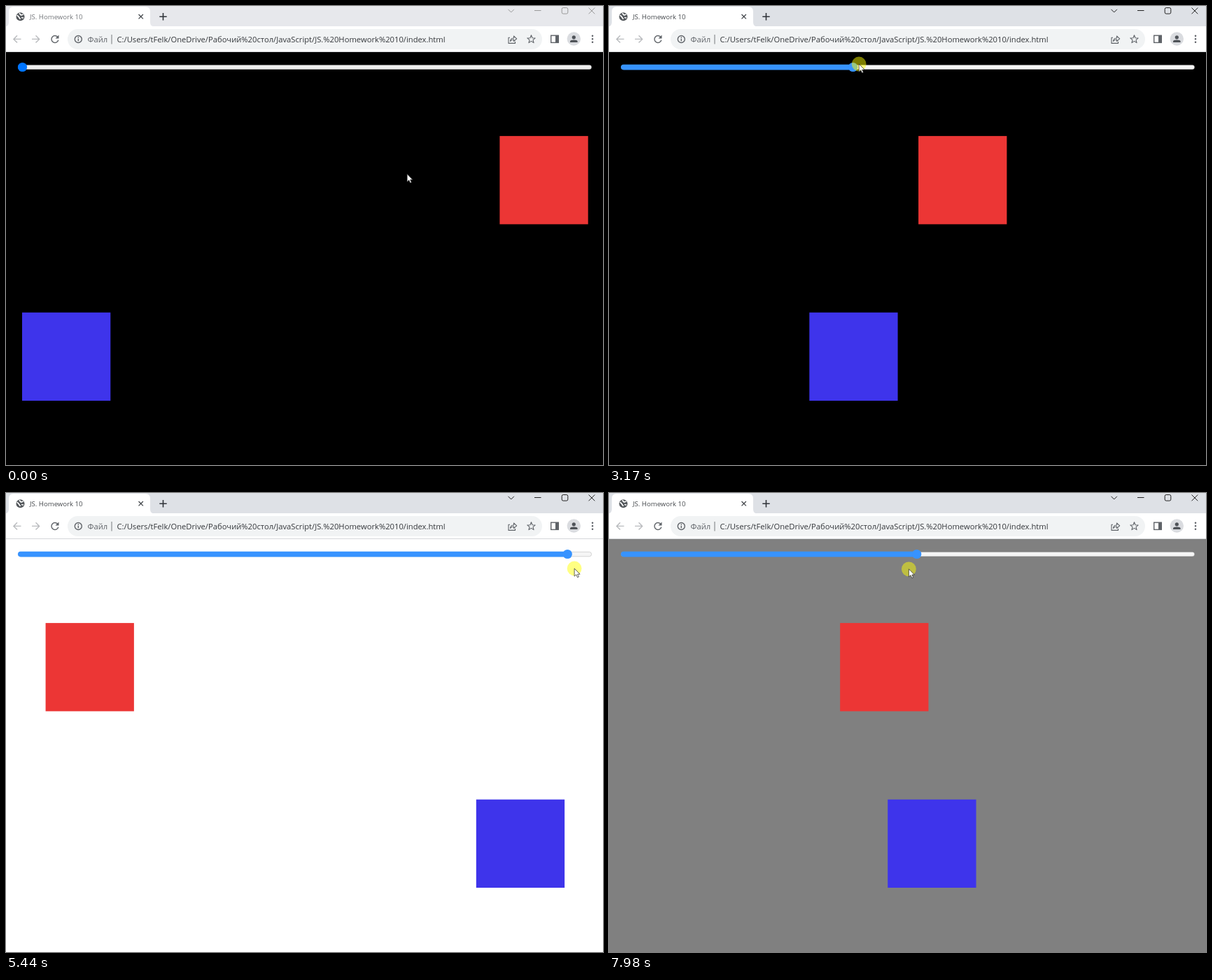
An HTML page for the animation above (8000 ms loop, 853 px wide and 657 px high).

```html
<!DOCTYPE html>
<html lang="ru">
<head>
<meta charset="utf-8">
<title>JS. Homework 10</title>
<style>
  html, body { margin: 0; width: 100%; height: 100%; overflow: hidden; background: #000; }
  svg { display: block; width: 853px; height: 657px; }
  text { font-family: "Open Sans", "Noto Sans", sans-serif; white-space: pre; }
  .line { fill: none; stroke: #5f6368; stroke-width: 1.4; }
  .thin { stroke-width: 1.1; stroke-linejoin: round; }
  .dim { stroke: #b9bbbe; }
</style>
</head>
<body>
<svg viewBox="0 0 853 657">
  <rect id="page" y="65" width="853" height="592"/>

  <!-- browser window -->
  <rect id="strip" width="853" height="30"/>
  <rect y="29" width="853" height="37" fill="#fff"/>
  <rect y="65" width="853" height="1" fill="#d5d7da"/>
  <path d="M-2 29.5Q4 29.5 4 23V8Q4 1 11 1H199Q206 1 206 8V23Q206 29.5 212 29.5Z" fill="#fff"/>
  <circle cx="20.5" cy="15.3" r="6" fill="#54585c"/>
  <path d="M15.8 13.2Q19 16 20.5 18.8M19 10.3L21.5 13 24.7 12M22 16.5L25 17" fill="none" stroke="#fff" stroke-width="1.7"/>
  <text id="tab" x="34" y="19" font-size="9.6">JS. Homework 10</text>
  <path d="M189.5 12l6.4 6.4m0-6.4l-6.4 6.4" fill="none" stroke="#45494d" stroke-width="1.3"/>
  <path d="M224.5 10v10.4M219.3 15.2h10.4" fill="none" stroke="#30343a" stroke-width="1.6"/>
  <path id="controls" d="M717.5 4.8l4.2 4.2 4.2-4.2M755 6.5h9.5M794.2 4.5q0-2 2-2h4.6q2 0 2 2v4.6q0 2-2 2h-4.6q-2 0-2-2ZM832.5 2.5l8.8 8.8m0-8.8l-8.8 8.8" fill="none"/>

  <path class="line dim" d="M21.5 47.4H11M16 42.3L10.9 47.4 16 52.5M37 47.4H47.5M42.5 42.3L47.6 47.4 42.5 52.5"/>
  <path class="line" d="M74 44.5A5 5 0 1 0 74.8 48.8"/>
  <path d="M75.5 41.5V46.5H70.5Z" fill="#5f6368"/>
  <rect x="88" y="33" width="678" height="29" rx="14.5" fill="#f1f3f4"/>
  <circle class="line" cx="103.3" cy="47.5" r="5"/>
  <path class="line" d="M103.3 46.7v3.5M103.3 44.3v1.4"/>
  <text x="116.5" y="51.5" font-size="11.23" fill="#5f6368">Файл</text>
  <path d="M151 41V54.5" stroke="#75797d"/>
  <text x="158.5" y="51.5" font-size="11.23" fill="#34373b">C:/Users/tFelk/OneDrive/Рабочий%20стол/JavaScript/JS.%20Homework%2010/index.html</text>
  <path class="line thin" d="M720 45.2H718V53.4H727.5V51M720.5 50.5Q721 46 725.5 46V43L729.7 46.8 725.5 50.5V48Q722.5 48 720.5 50.5Z"/>
  <path id="star" class="line thin"/>
  <rect class="line" x="778.7" y="42.2" width="10.6" height="10.2"/>
  <path d="M785 42h4.5v10.5h-4.5Z" fill="#5f6368"/>
  <circle cx="811.3" cy="47" r="9.7" fill="#dadce0"/>
  <path d="M806 52V50.8Q806 48.4 811.3 48.4T816.6 50.8V52Z" fill="#4f5358"/>
  <circle cx="811.3" cy="44.8" r="2.6" fill="#4f5358"/>
  <path d="M838 42.7v.01M838 47.2v.01M838 51.7v.01" stroke="#5f6368" stroke-width="2.6" stroke-linecap="round"/>

  <!-- page content -->
  <rect id="red" y="186.1" width="126.3" height="126.3" fill="#ec3635"/>
  <rect id="blue" y="438.7" width="126.3" height="126.3" fill="#3e34eb"/>
  <rect id="track" x="17.4" y="84.4" width="819.2" height="6.4" rx="3.2" stroke="#767676" stroke-opacity=".35" stroke-width=".8"/>
  <rect id="fill" x="17" y="83.7" height="7.7" rx="3.8"/>
  <circle id="thumb" cy="87.5" r="6.6"/>
  <g id="cursor">
    <circle id="halo" r="10.4" fill="#ff0" fill-opacity=".49"/>
    <path d="M0 0V11.2L2.6 8.8 4.4 12.8 6.3 12 4.5 8.2H8Z" fill="#fff" stroke="#222" stroke-width=".7"/>
  </g>
</svg>
<script>
const LOOP = 8000, PRESS = 1560;
const THUMB_LAG = 40, BOX_LAG = 120;
const MIN_X = 23.5, MAX_X = 830.5;

// pointer waypoints: time, x, y
const route = [
  [0, 574, 241], [330, 288, 92], [810, 30, 80], [PRESS, 26, 86],
  [1890, 82, 86], [3170, 357, 83], [4710, 585, 95], [4790, 650, 97],
  [5440, 812, 108], [5770, 846, 108], [6110, 846, 108],
  [6810, 667, 97], [7700, 508, 106], [LOOP, 423, 109]
];

const $ = id => document.getElementById(id);
const set = (id, attrs) => {
  for (const name in attrs) $(id).setAttribute(name, attrs[name]);
};
const mix = (a, b, k) => a + (b - a) * k;

function pointer(t) {
  const i = route.findIndex(stop => stop[0] > t);
  const [t0, x0, y0] = route[i - 1], [t1, x1, y1] = route[i];
  const k = (t - t0) / (t1 - t0);
  return [mix(x0, x1, k), mix(y0, y1, k)];
}

// slider value from 0 to 1, as the pointer left it `lag` ms ago
function value(t, lag) {
  if (t - lag < PRESS) return 0;
  const v = (pointer(t - lag)[0] - MIN_X) / (MAX_X - MIN_X);
  return Math.min(1, Math.max(0, v));
}

function draw(t) {
  const pressed = t >= PRESS;
  const [x, y] = pointer(t);
  const hover = !pressed && y > 81 && y < 93 && x < 837;
  const accent = pressed ? '#3793ff' : hover ? '#005cc8' : '#0075ff';
  const v = value(t, THUMB_LAG);
  const knob = mix(MIN_X, MAX_X, v);
  const left = mix(23, 713, value(t, BOX_LAG));

  set('page', { fill: v < .41 ? '#000' : v < .815 ? '#808080' : '#fff' });
  set('strip', { fill: pressed ? '#dee1e6' : '#e7e8ec' });
  set('tab', { fill: pressed ? '#45494d' : '#74777b' });
  set('controls', { stroke: pressed ? '#222' : '#999' });
  set('track', { fill: pressed ? '#f5f5f5' : hover ? '#e5e5e5' : '#efefef' });
  set('fill', { width: knob - 17, fill: accent });
  set('thumb', { cx: knob, fill: accent });
  set('blue', { x: left });
  set('red', { x: 728.4 - left });
  set('halo', { visibility: pressed ? 'visible' : 'hidden' });
  set('cursor', { transform: `translate(${x} ${y})` });
}

const starPoints = Array.from({ length: 10 }, (_, i) => {
  const r = i % 2 ? 2.6 : 6, a = i * Math.PI / 5;
  return `${750.5 + r * Math.sin(a)} ${47.8 - r * Math.cos(a)}`;
});
set('star', { d: `M${starPoints.join('L')}Z` });

const start = performance.now();
function tick() {
  draw((performance.now() - start) % LOOP);
  requestAnimationFrame(tick);
}
tick();
</script>
</body>
</html>
```
